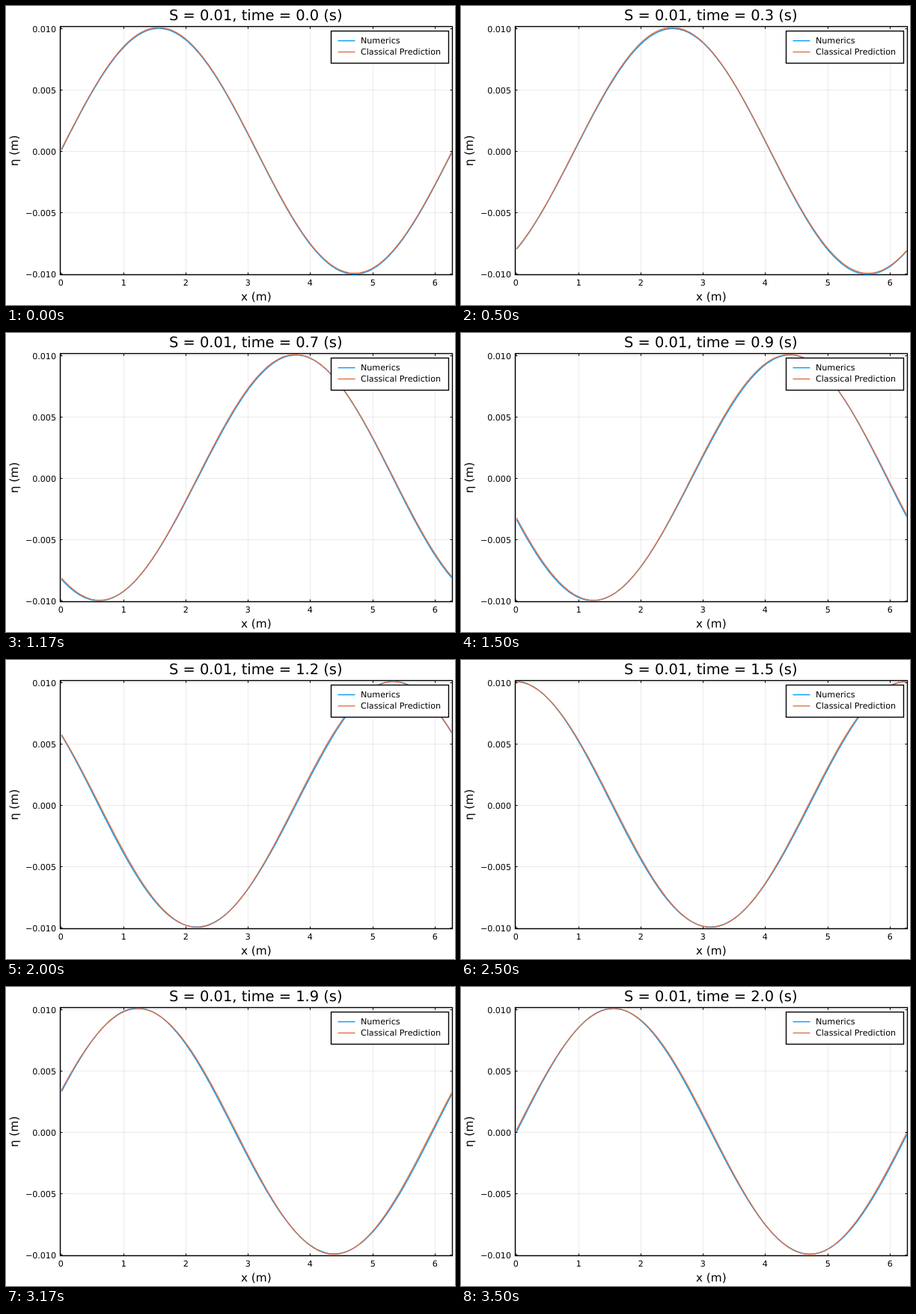
Animation, 600 px wide and 400 px high, one loop 3670 ms. Source, as an HTML page:

```html
<!DOCTYPE html>
<html lang="en">
<head>
<meta charset="utf-8">
<title>Travelling wave</title>
<style>
  html, body { margin: 0; width: 100%; height: 100%; overflow: hidden; background: #fff; }
  svg { display: block; width: 600px; height: 400px; }
  text { font: 11.11px "DejaVu Sans", sans-serif; text-anchor: middle; text-rendering: geometricPrecision; }
  .title { font-size: 19.44px; }
  .label { font-size: 15.28px; }
  .end { text-anchor: end; }
  .start { text-anchor: start; }
  .grid { stroke: #000; stroke-opacity: .1; stroke-width: .8; }
  .tick { stroke: #000; stroke-width: 1; }
  .frame { fill: none; stroke: #000; stroke-width: 1.4; }
  .curve { fill: none; stroke-width: 1.4; stroke-linejoin: round; }
  .numerics { stroke: #009afa; }
  .classical { stroke: #e36f47; }
</style>
</head>
<body>
<svg viewBox="0 0 600 400">
  <clipPath id="plot"><rect x="72.5" y="27.5" width="524" height="332"/></clipPath>
  <g id="axes"></g>
  <rect class="frame" x="72.5" y="27.5" width="524" height="332"/>
  <g clip-path="url(#plot)">
    <path id="numerics" class="curve numerics"/>
    <path id="classical" class="curve classical"/>
  </g>
  <rect class="frame" x="434.5" y="33.5" width="157" height="43" style="fill:#fff"/>
  <path class="curve numerics" d="M443.5 46.5h23"/>
  <path class="curve classical" d="M443.5 61.5h23"/>
  <text class="start" x="474" y="50.2">Numerics</text>
  <text class="start" x="474" y="65.2">Classical Prediction</text>
  <text id="title" class="title" x="333.8" y="18.9"></text>
  <text class="label" x="334.3" y="393.8">x (m)</text>
  <text class="label" transform="translate(15.7 193.5) rotate(-90)">η (m)</text>
</svg>
<script>
const $ = id => document.getElementById(id);
const LOOP = 3670, OMEGA = Math.sqrt(9.81), PERIOD = 2 * Math.PI / OMEGA;
const AMPLITUDE = 0.01, SAMPLES = 256;
const px = x => 73.2 + 83.3 * x;
const py = eta => 193.8 - 16430 * eta;
const snap = p => Math.round(p) + 0.5;

function drawAxes() {
  let svg = '';
  for (let x = 0; x <= 6; x++) {
    const p = snap(px(x));
    svg += `<path class="grid" d="M${p} 28V359"/>
      <path class="tick" d="M${p} 359.5v-3M${p} 27.5v3"/>
      <text x="${p - 0.3}" y="374">${x}</text>`;
  }
  for (let i = -2; i <= 2; i++) {
    const p = snap(py(i * 0.005));
    const label = (i < 0 ? '−' : '') + Math.abs(i * 0.005).toFixed(3);
    svg += `<path class="grid" d="M73 ${p}H596"/>
      <path class="tick" d="M72.5 ${p}h3M596.5 ${p}h-3"/>
      <text class="end" x="67" y="${p + 4}">${label}</text>`;
  }
  $('axes').innerHTML = svg;
}

const linearWave = (x, t) => AMPLITUDE * Math.sin(x - OMEGA * t);

// Second-order correction: bound harmonic plus free waves in both directions.
function nonlinearWave(x, t) {
  const phase = 2 * x - Math.PI, free = Math.SQRT2 * OMEGA * t;
  return linearWave(x, t) + AMPLITUDE ** 2 * (
    0.5 * Math.cos(phase - 2 * OMEGA * t)
    - 0.6036 * Math.cos(phase - free)
    + 0.1036 * Math.cos(phase + free));
}

function curve(wave, t, shift) {
  const points = Array.from({ length: SAMPLES }, (_, i) => {
    const x = (i + 0.5) * 2 * Math.PI / SAMPLES;
    return `${px(x).toFixed(2)} ${(py(wave(x, t)) + shift).toFixed(2)}`;
  });
  return 'M' + points.join('L');
}

function render() {
  const ms = performance.now() % LOOP, part = ms % 500;
  const step = 3 * Math.floor(ms / 500) + (part >= 170) + (part >= 330);
  const t = Math.min(step * 0.1, PERIOD);
  $('title').textContent = `S = 0.01, time = ${t.toFixed(1)} (s)`;
  $('numerics').setAttribute('d', curve(nonlinearWave, t, 0.6));
  $('classical').setAttribute('d', curve(linearWave, t, -0.6));
  requestAnimationFrame(render);
}

drawAxes();
render();
</script>
</body>
</html>
```
